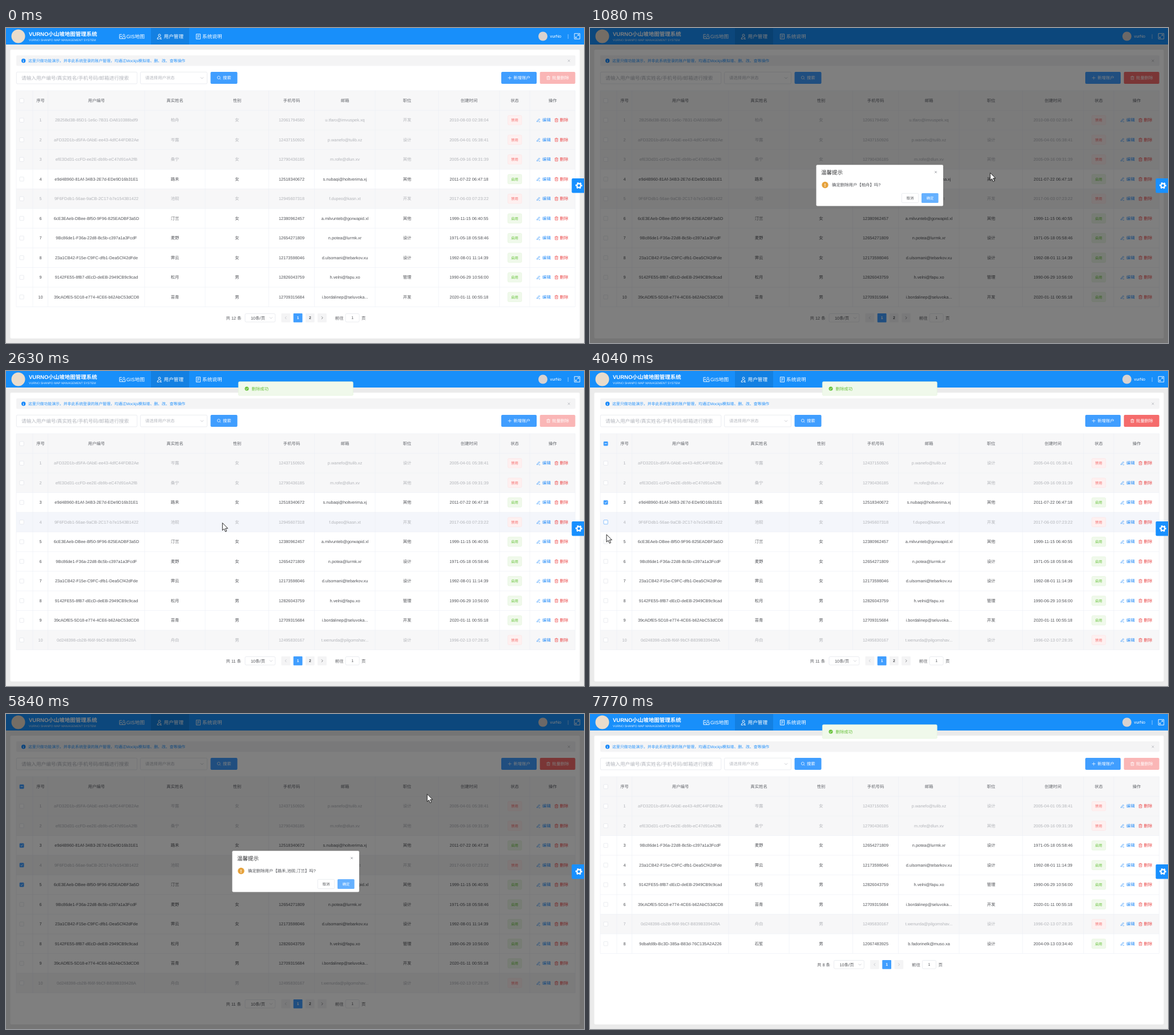
An HTML page that plays this animation: 1013x553 px, repeating every 8230 ms.

```html
<!DOCTYPE html>
<html>
<head>
<meta charset="utf-8">
<title>用户管理</title>
<style>
html, body { margin: 0; width: 100%; height: 100%; overflow: hidden; background: #ebebeb }
svg { display: block; font-family: 'Liberation Sans', 'Noto Sans CJK SC', 'Noto Sans CJK', sans-serif; text-rendering: geometricPrecision }
</style>
</head>
<body>
<svg width="1013" height="553" viewBox="0 0 1013 553">
  <g id="page"></g>
  <rect id="shade" width="1013" height="553"/>
  <g id="dialog"></g>
  <g id="message"></g>
  <g id="gear"></g>
  <path id="cursor" fill="#fff" stroke="#111" stroke-width=".9" stroke-linejoin="round"/>
</svg>
<script>
const LOOP = 8230, TOP = 144.5, ROW = 34.5;
const BLUE = '#409eff', RED = '#f56c6c', GREEN = '#67c23a', LINE = '#ebeef5', EDGE = '#dcdfe6', TEXT = '#515358', PALE = '#b2b4b9';
const $ = id => document.getElementById(id);

const text = (x, y, s, fill = TEXT, size = 7.39, anchor = 'middle', weight = 400) =>
  `<text x="${x}" y="${y + size * .37}" fill="${fill}" font-size="${size}" text-anchor="${anchor}" font-weight="${weight}">${s}</text>`;
const left = (x, y, s, fill, size, weight) => text(x, y, s, fill, size, 'start', weight);
const rect = (x, y, w, h, fill, stroke = 'none', r = 0) =>
  `<rect x="${x}" y="${y}" width="${w}" height="${h}" fill="${fill}" stroke="${stroke}" stroke-width=".6" rx="${r}"/>`;
const disc = (x, y, r, fill) => `<circle cx="${x}" cy="${y}" r="${r}" fill="${fill}"/>`;
const icon = (x, y, name, color, width = .7) =>
  `<path transform="translate(${x} ${y})" d="${ICONS[name]}" fill="none" stroke="${color}" stroke-width="${width}"/>`;

const ICONS = {
  search: 'M2-.5a2.5 2.5 0 1 1-5 0a2.5 2.5 0 1 1 5 0M1.3 1.3 3 3',
  plus: 'M-3 0h6M0-3v6',
  trash: 'M-3-2h6M-1-2v-1h2v1M-2.3-2v5h4.6v-5M-.7-.5v2M.7-.5v2',
  edit: 'M-2.4 1.6 1.4-2.6 2.6-1.4-1.2 2.6-2.6 2.8zM.5 3h2.7',
  loading: 'M0-3v1.6M0 3v-1.6M-3 0h1.6M3 0h-1.6M-2-2l1 1M2 2l-1-1M2-2l-1 1M-2 2l1-1',
  close: 'M-1.8-1.8 1.8 1.8M1.8-1.8-1.8 1.8',
  down: 'M-2.5-1.2 0 1.3 2.5-1.2',
  prev: 'M1-2.3-1.2 0 1 2.3',
  next: 'M-1-2.3 1.2 0-1 2.3',
  tick: 'M-2 0-.6 1.5 2-1.4',
  dash: 'M-2 0h4',
  map: 'M-1-3.7h-4v7.4h10v-4M-5 1.5-2-1 1 3.7M2.5 1C.3-1.2.6-4 2.5-4S4.7-1.2 2.5 1z',
  user: 'M2-2.2a2 2 0 1 1-4 0a2 2 0 1 1 4 0M-4 4.3Q-4 .8-.5.8M1 1.5v2.8h3M-4 4.3h3.5M2.5 1v2',
  doc: 'M-3.6-4.3h7.2v8.6h-7.2zM-1.8-2h3.6M-1.8 0h3.6M-1.8 2h2',
  full: 'M-4.8-4.8h9.6v9.6h-9.6zM.8-2.8h2v2M2.8-2.8.5-.5M-.8 2.8h-2v-2M-2.8 2.8-.5.5'
};
const ARROW = 'M0 0V13.2L3.1 10.4 5.2 15.4 7.4 14.4 5.3 9.6H9.4z';
const HAND = 'M-1.4 1.4a1.4 1.4 0 0 1 2.8 0V7.2l4.4 1.1q1.9.5 1.6 2.6l-.9 4.4q-.3 2-2 2H-.6q-1.2 0-2-1.2L-6 11.3q-.6-1.3.5-1.8t2 .6l2.1 1.8z';

// id, name, gender, phone, mail, job, created, enabled
const USERS = `2B25Bd3B-85D1-1e6c-7B31-DA810388bdf9|柏舟|女|12061794580|u.tfaro@imvuspek.xq|开发|2010-08-03 02:38:04|
aFD32D1b-d5FA-0AbE-ee43-4dfC44FDB2Ae|岑露|女|12437150926|p.wanefo@tulib.xz|设计|2005-04-01 05:38:41|
efE3Dd31-ccFD-ee2E-db9b-eC47d91eA2fB|桑宁|女|12790436185|m.rofe@dlun.xv|其他|2005-09-16 09:31:39|
e9d4B960-81Af-34B3-2E7d-EDe9D16b31E1|路禾|女|12518340672|s.nubaqi@holtverima.xj|其他|2011-07-22 06:47:18|1
9F6FDdb1-56ae-9aCB-2C17-b7e1543B1422|池砚|女|12945607318|f.dupeo@kasn.xt|开发|2017-06-03 07:23:22|
6cE3EAeb-DBee-Bf50-9F96-825EADBF3a5D|汀兰|女|12380962457|a.milvunteb@gorwapid.xl|其他|1999-11-15 06:40:55|1
9Bc86de1-F36a-22d8-Bc5b-c397a1a3FcdF|麦野|女|12654271809|n.potea@lurmk.xr|设计|1971-05-18 05:58:46|1
23a1CB42-F15e-C9FC-dfb1-Dea5Cf42dFde|霁云|女|12173598046|d.ulsomani@tebarkov.xu|设计|1992-08-01 11:14:39|1
9142FE55-8fB7-dEcD-deEB-2949CB9c9cad|松月|男|12826043759|h.velni@fapu.xo|管理|1990-06-29 10:56:00|1
39cADfE5-5D18-e774-4CE6-b62AbC53dCD8|苔青|男|12709315684|i.bordalinep@seluvoka...|开发|2020-01-11 00:55:18|1
0d248398-cb2B-f66f-9bCf-B839B339428A|舟白|男|12495830167|t.wenurda@pilgomshav...|设计|1996-02-13 07:28:35|
9dbafd8b-Bc3D-385a-B83d-76C135A2A226|石笙|男|12067483925|b.fadorinelk@muso.xa|设计|2004-09-13 03:34:40|1`
  .split('\n').map(row => row.split('|'));
const LISTS = [USERS.slice(0, 10), USERS.slice(1, 11), [...USERS.slice(1, 3), ...USERS.slice(6)]];
const HEADS = ['序号', '用户编号', '真实姓名', '性别', '手机号码', '邮箱', '职位', '创建时间', '状态', '操作'];
const CENTERS = [60.5, 158.5, 296, 405, 500.5, 594, 703, 811.5, 891.5, 958];
const COLUMNS = [18, 47, 73.5, 243, 349, 460.5, 540.5, 647, 758, 865, 918, 997.5];

function header() {
  return rect(0, 0, 1013, 29, '#188ffa') + rect(254, 0, 67, 29, '#1380e2')
    + disc(21.5, 14.5, 12, '#eadccb')
    + left(40, 10.5, 'VURNO小山坡地图管理系统', '#fff', 9.5, 700)
    + left(40, 21, 'VURNO SHANPO MAP MANAGEMENT SYSTEM', '#e3f1ff', 5.28)
    + [[204, 211, 'GIS地图', 'map'], [269, 276.5, '用户管理', 'user'], [337, 344, '系统说明', 'doc']]
      .map(([ix, x, s, name]) => icon(ix, 15, name, '#fff', .9) + left(x, 14.7, s, '#fff', 8.65)).join('')
    + disc(941, 14.5, 8, '#d9d2cf') + left(953.5, 14.5, 'vurNo', '#fff')
    + rect(984.8, 11, .6, 8, '#d5eaff') + icon(1001, 14.5, 'full', '#fff', .9);
}

function toolbar(batch) {
  const button = (x, w, fill, name, label) => rect(x, 77, w, 21, fill, 'none', 2)
    + icon(x + 14.8, 87.5, name, '#fff') + left(x + 21.4, 87.5, label, '#fff');
  return rect(18, 48, 980, 18.5, '#f4f4f5', 'none', 2) + disc(30.7, 57.5, 3.7, '#1989fa')
    + text(30.7, 57.5, 'i', '#fff', 6, 'middle', 700)
    + left(39, 57, '这里只做功能演示，并非此系统登录的账户管理，均通过Mockjs模拟增、删、改、查等操作', '#2492fc', 6.86)
    + icon(986.5, 57.5, 'close', '#a0a3a9')
    + rect(18.3, 77.3, 211.5, 20.7, '#fff', EDGE, 2)
    + left(27, 87.5, '请输入用户编号/真实姓名/手机号码/邮箱进行搜索', '#b3b6bd', 8.65)
    + rect(235.5, 77.3, 117, 20.7, '#fff', EDGE, 2)
    + left(244, 87.5, '请选择用户状态', '#b3b6bd') + icon(343.5, 87.7, 'down', '#b3b6bd')
    + button(358.5, 47, BLUE, 'search', '搜索')
    + button(868, 62, BLUE, 'plus', '新增账户')
    + button(935.7, 62, batch == 'on' ? RED : '#fab6b6', batch == 'busy' ? 'loading' : 'trash', '批量删除');
}

function checkbox(y, mark, hot) {
  const on = mark != '';
  return rect(24, y - 3.6, 7.2, 7.2, on ? BLUE : '#fff', on || hot ? BLUE : EDGE, 1)
    + (ICONS[mark] ? icon(27.6, y, mark, '#fff', .9) : '');
}

function row(user, i, checked, hover, hot) {
  const y = TOP + i * ROW, mid = y + ROW / 2, on = user[7], ink = on ? TEXT : PALE;
  return rect(18, y, 979.5, ROW, hover ? '#f4f6fb' : on ? '#fff' : '#f7f7f8')
    + checkbox(mid, checked ? 'tick' : '', hover && hot)
    + [i + 1, ...user.slice(0, 7)].map((s, c) => text(CENTERS[c], mid, s, ink)).join('')
    + rect(879.5, mid - 8.3, 24.3, 16.6, on ? '#f0f9eb' : '#fef0f0', on ? '#e1f3d8' : '#fde2e2', 2)
    + text(891.5, mid, on ? '启用' : '禁用', on ? GREEN : RED, 6.33)
    + icon(933, mid, 'edit', '#2f93fc') + left(940, mid, '编辑', '#258cf8')
    + icon(964.7, mid, 'trash', '#f05050') + left(970.5, mid, '删除', '#ea4343');
}

function table(list, s) {
  const bottom = TOP + list.length * ROW;
  let out = rect(18, 110, 979.5, ROW, '#f7f7f8') + checkbox(127.5, s.all)
    + HEADS.map((h, c) => text(CENTERS[c], 127, h, '#63666c')).join('')
    + list.map((u, i) => row(u, i, s.checked.includes(i), s.hover == i, s.hot)).join('');
  for (let i = -1; i <= list.length; i++) out += rect(18, TOP + i * ROW - .3, 979.5, .6, LINE);
  for (const x of COLUMNS) out += rect(x - .3, 110, .6, bottom - 110, LINE);
  return out + pager(bottom + 19.3, [12, 11, 8][s.list]);
}

function pager(y, total) {
  const two = total > 10, x = two ? 419 : 427.5, pages = two ? [1, 2] : [1];
  const prev = x + 63.5, next = prev + 21.2 * (pages.length + 1);
  const button = (bx, on) => rect(bx, y - 7.9, 15.8, 15.8, on ? BLUE : '#f4f4f5', 'none', 1);
  return left(two ? 385.5 : 398, y, `共 ${total} 条`) + rect(x, y - 7.3, 52.8, 14.6, '#fff', EDGE, 2)
    + left(x + 10, y + .3, '10条/页') + icon(x + 45.5, y, 'down', '#b3b6bd', .6)
    + button(prev) + icon(prev + 7.9, y, 'prev', '#b3b6bd')
    + pages.map(n => {
      const bx = prev + 21.2 * n;
      return button(bx, n == 1) + text(bx + 7.9, y, n, n == 1 ? '#fff' : TEXT, 6.86, 'middle', 700);
    }).join('')
    + button(next) + icon(next + 7.9, y, 'next', two ? '#606266' : '#b3b6bd')
    + left(next + 30.7, y, '前往') + rect(next + 49, y - 7.3, 24, 14.6, '#fff', EDGE, 2)
    + text(next + 61, y, 1, TEXT, 6.86) + left(next + 77, y, '页');
}

const page = s => rect(0, 0, 1013, 553, '#ebebeb') + header() + rect(7.5, 38, 998, 507, '#fff', 'none', 2)
  + toolbar(s.batch) + table(LISTS[s.list], s);

const dialog = names => rect(396.5, 240.3, 222.5, 72.2, '#fff', 'none', 2)
  + left(405, 253.5, '温馨提示', '#303133', 9.5) + icon(606, 253, 'close', '#909399', .8)
  + disc(412, 275.5, 5.7, '#e6a23c') + text(412, 275.5, '!', '#fff', 8.5, 'middle', 700)
  + left(424, 275.5, `确定删除用户【${names}】吗?`)
  + rect(546.3, 290.3, 29.3, 16.3, '#fff', EDGE, 1.5) + text(561, 298.5, '取消', TEXT, 6.33)
  + rect(581, 290, 29.6, 17, '#66b1ff', 'none', 1.5) + text(596, 298.5, '确定', '#fff', 6.33);

$('message').innerHTML = rect(407.3, 18.7, 201, 24.3, '#f0f9eb', '#e1f3d8', 2) + disc(422, 31, 3.5, GREEN)
  + icon(422, 31, 'tick', '#fff', .8) + left(430.5, 31, '删除成功', GREEN);
$('gear').innerHTML = '<path d="M1013 264h-19.5q-2 0-2 2v21.5q0 2 2 2h19.5z" fill="#1890ff"/>'
  + '<g fill="none" stroke="#fff" transform="translate(1004 276.6) rotate(-16.5)"><circle r="3.4" stroke-width="2.2"/>'
  + '<circle r="5" stroke-width="1.9" stroke-dasharray="2.9 2.336"/></g>';

// time, x, y of the pointer tip
const POINTER = [[70, 189, 390], [300, 560, 270], [530, 978, 159], [850, 978, 159], [1080, 702, 254], [1240, 595, 288],
  [1390, 595, 288], [1560, 594, 293], [2250, 594, 293], [2480, 480, 276], [2900, 200, 250], [3340, 27, 231], [3640, 27, 231],
  [3810, 28, 262], [4040, 29, 287], [4280, 28, 299], [4560, 28, 299], [4990, 900, 125], [5200, 966, 86], [5680, 966, 86],
  [5840, 741, 138], [5920, 514, 347], [6000, 514, 337], [6150, 514, 337], [6610, 594, 298]];
const HANDS = [[480, 900], [1200, 2300], [3300, 3800], [4240, 4580], [5150, 5720], [6540, 7600]];
// time, shade, dialog opacity, dialog shift
const POPUP = [[850, 0, 0, -10], [1060, .5, 1, 0], [1780, .5, 1, 0], [1940, .175, .3, -2], [2060, 0, 0, -5],
  [5480, 0, 0, -10], [5700, .5, 1, 0], [6930, .5, 1, 0], [7100, .34, .33, -2.7], [7280, 0, 0, -7]];
// time, opacity, part still above its resting place
const TOAST = [[2000, 0, 1], [2100, .36, .77], [2350, 1, 0], [5140, 1, 0], [5450, 0, 1], [7000, 0, 1], [7100, .36, .77], [7360, 1, 0]];

function track(keys, t) {
  const i = keys.findIndex(k => k[0] > t);
  if (i < 1) return keys.at(i).slice(1);
  const a = keys[i - 1], b = keys[i], p = (t - a[0]) / (b[0] - a[0]);
  return a.slice(1).map((v, j) => v + (b[j + 1] - v) * p);
}
const within = (t, spans) => spans.some(([a, b]) => t >= a && t < b);

function stateAt(t) {
  const [x, y] = track(POINTER, t - 100);
  const hovering = y > TOP && within(t, [[2400, 5300], [7350, 7600]]);
  return {
    list: t < 2010 ? 0 : t < 7060 ? 1 : 2,
    checked: t < 7180 ? [3550, 4110, 4440].flatMap((c, i) => t >= c ? [i + 2] : []) : [],
    all: t < 3550 || t >= 7180 ? '' : t < 7060 ? 'dash' : 'plain',
    batch: within(t, [[850, 1710], [3550, 6840]]) ? 'on' : within(t, [[1710, 2010], [6840, 7060]]) ? 'busy' : 'off',
    hover: hovering ? Math.floor((y - TOP) / ROW) : -1,
    hot: x < 47
  };
}

const shown = {};
function fill(id, key, make) {
  if (shown[id] === key) return;
  shown[id] = key;
  $(id).innerHTML = make();
}

function draw() {
  const t = performance.now() % LOOP;
  const state = stateAt(t);
  fill('page', JSON.stringify(state), () => page(state));

  const [dim, alpha, shift] = track(POPUP, t);
  const names = (t < 4000 ? [0] : [3, 4, 5]).map(i => USERS[i][1]).join();
  fill('dialog', names, () => dialog(names));
  $('shade').setAttribute('opacity', dim);
  $('dialog').setAttribute('opacity', alpha);
  $('dialog').setAttribute('transform', `translate(0 ${shift})`);

  const [glow, above] = track(TOAST, t);
  $('message').setAttribute('opacity', glow);
  $('message').setAttribute('transform', `translate(0 ${-24.5 * above})`);

  const [x, y] = track(POINTER, t);
  $('cursor').setAttribute('d', within(t, HANDS) ? HAND : ARROW);
  $('cursor').setAttribute('transform', `translate(${x} ${y})`);
  $('cursor').setAttribute('opacity', t >= 70 && t < 7600 ? 1 : 0);
  requestAnimationFrame(draw);
}
draw();
</script>
</body>
</html>
```
